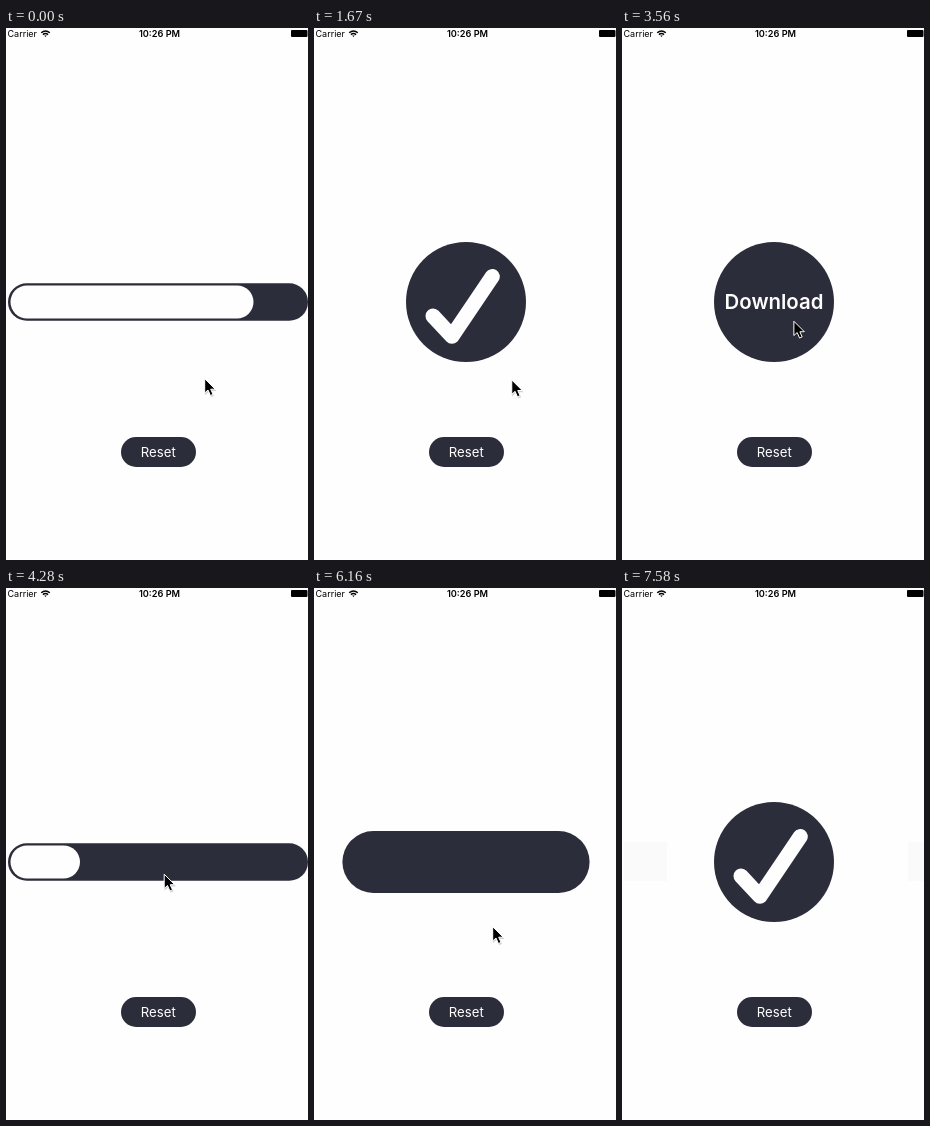
Recreate the animation shown at these times as an HTML page. Size 302 px wide and 532 px high, loop 7.97 s.

```html
<!DOCTYPE html>
<html lang="en">
<head>
<meta charset="utf-8">
<title>Download button</title>
<style>
html, body { margin: 0; width: 100%; height: 100%; overflow: hidden; background: #fefefe; }
svg { display: block; width: 100vw; height: 100vh; font-family: Inter, Roboto, sans-serif; }
.dark { fill: #2c2d3a; }
.light { fill: #fefefe; }
.mid { text-anchor: middle; }
</style>
</head>
<body>
<svg viewBox="0 0 302 532">
  <text x="1.5" y="9" font-size="9">Carrier</text>
  <g fill="none" stroke="#000" stroke-width="1.4">
    <path d="M35.2 4.8Q39.5 1 43.8 4.8M36.9 6.6Q39.5 4.4 42.1 6.6"/>
    <path d="M38.2 7.5H40.8L39.5 8.9Z" fill="#000" stroke="none"/>
  </g>
  <text class="mid" x="153.5" y="9" font-size="9.2" font-weight="600">10:26 PM</text>
  <rect x="285" y="2" width="16.500" height="7" rx="1"/>

  <path id="shade" fill="#fafafa" d="M2 254h43v39H2zM286 254h16v39h-16z"/>
  <rect id="body" class="dark"/>
  <rect id="fill" class="light" x="4.500" y="257.500" height="33" rx="16.500"/>
  <path id="check" d="M119 288L138 308.300L178.300 248.500" pathLength="100" fill="none"
    stroke="#fefefe" stroke-width="15" stroke-linecap="round" stroke-linejoin="round"/>
  <text id="label" class="light mid" x="152" y="281.300" font-size="20.400" font-weight="600">Download</text>

  <rect class="dark" x="115" y="409" width="75" height="30" rx="15"/>
  <text class="light mid" x="152.300" y="429" font-size="13.200">Reset</text>

  <g id="cursor">
    <path d="M1 2V17L4.500 14L7 19L10 18L8 13H12.500Z" opacity=".18"/>
    <path d="M.7 .7V15L4 12L6.400 17.500L9 16.400L6.700 11.200H11.200Z" stroke="#fff"/>
  </g>
</svg>
<script>
const LOOP = 7970, STEP = 118.3;
const $ = id => document.getElementById(id);
const show = (id, on) => $(id).setAttribute("visibility", on ? "visible" : "hidden");
const set = (id, attrs) => {
  for (const key in attrs) $(id).setAttribute(key, attrs[key]);
};
const mix = (a, b, p) => a + (b - a) * p;
const progress = (t, from, to) => Math.min(1, Math.max(0, (t - from) / (to - from)));
const ease = p => p * p * (3 - 2 * p);

// Cursor resting places, and the eased moves between them
const side = [198, 350], reset = [152.5, 414], bar = [157.5, 285.5], below = [178, 338], away = [284, 545];
const moves = [
  { from: 1610, to: 2270, a: side, b: reset },
  { from: 2860, to: 3680, a: reset, b: bar, bend: [281, 345] },
  { from: 4400, to: 5450, a: bar, b: below },
  { from: 6870, to: 7580, a: below, b: away },
];

function cursorAt(t) {
  const { from, to, a, b, bend } = moves.filter(m => t >= m.from).pop() || moves[0];
  const p = ease(progress(t, from, to));
  return a.map((v, i) => bend
    ? mix(mix(v, bend[i], p), mix(bend[i], b[i], p), p)
    : mix(v, b[i], p));
}

function draw(now) {
  const loading = now < 720 || (now >= 4280 && now < 6160);
  const ready = now >= 2620 && now < 4280;
  const done = !loading && !ready;

  // Motion advances in even steps
  const t = Math.floor(now / STEP) * STEP + 10;
  const since = t - (now < 2620 ? 720 : 6160);

  // Bar shrinks into the circle, then the tick is drawn
  const morph = loading ? 0 : ready ? 1 : progress(since, -60, 150);
  const w = mix(300, 120, morph), h = mix(37.6, 120, morph);
  set("body", { x: 152 - w / 2, y: 274 - h / 2, width: w, height: h, rx: h / 2 });

  const drawn = done ? 100 * progress(since, 163, 460) : 0;
  show("check", drawn > 0);
  set("check", { "stroke-dasharray": drawn < 100 ? `${drawn} 200` : "none" });

  // Loading lags a little before it catches up at the end
  const p = now < 720 ? 1 : progress(t, 4280, 5450);
  show("fill", loading);
  set("fill", { width: mix(69.5, 243, p - 1.3 * p ** 4 * (1 - p)) });

  show("label", ready);
  show("shade", t > 6270);
  set("cursor", { transform: `translate(${cursorAt(t)})` });
}

function frame(now) {
  draw(now % LOOP);
  requestAnimationFrame(frame);
}
draw(0);
requestAnimationFrame(frame);
</script>
</body>
</html>
```
